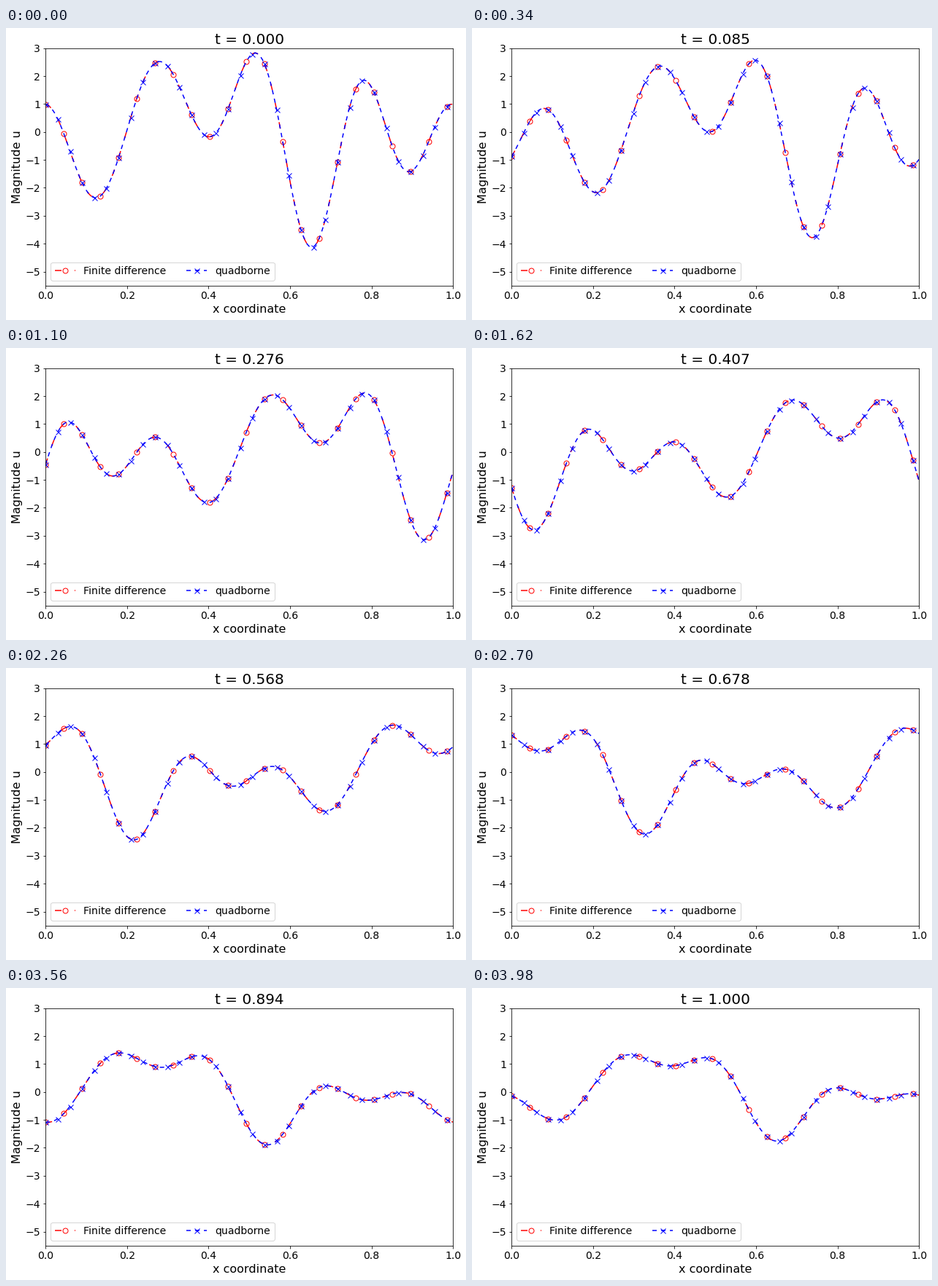
These frames come from a looping animation (630x401 px, 4000 ms). A matplotlib script:

```python
import numpy as np
import matplotlib.pyplot as plt
from matplotlib.animation import FuncAnimation

W, H, DPI = 630, 401, 72
FRAMES, INTERVAL = 200, 20

# Linear advection, first-order upwind on a periodic grid
NX, NT, DT, SPEED = 202, 2000, 0.0005, 1.0
x = np.linspace(0, 1, NX)
cfl = SPEED * DT / (x[1] - x[0])

COS = (-0.488, 0.118, -0.504, 1.72, 0.1445)
SIN = (0.694, -1.159, -0.195, 0.899, -0.368)


def initial(x):
    u = np.zeros_like(x)
    for k, (a, b) in enumerate(zip(COS, SIN), start=1):
        u += a * np.cos(2 * np.pi * k * x) + b * np.sin(2 * np.pi * k * x)
    return u


def solve():
    u = np.empty((NT + 1, NX))
    u[0] = initial(x)
    for n in range(NT):
        u[n + 1] = u[n] - cfl * (u[n] - np.roll(u[n], 1))
    return u


history = solve()
steps = np.linspace(0, NT, FRAMES).astype(int)

plt.rcParams["font.family"] = "DejaVu Sans"
fig = plt.figure(figsize=(W / DPI, H / DPI), dpi=DPI, facecolor="white")
ax = fig.add_axes([54.2 / W, 47.2 / H, 558 / W, 326.16 / H])
ax.set_xlim(0, 1)
ax.set_ylim(-5.5, 3)
ax.set_xticks(np.arange(6) / 5)
ax.set_yticks(range(-5, 4))
ax.tick_params(labelsize=14)
ax.set_xlabel("x coordinate", fontsize=16)
ax.set_ylabel("Magnitude u", fontsize=16)
title = ax.set_title("t = 0.000", fontsize=20)


def add_line(color, marker, dashes, every, label):
    line, = ax.plot(x, history[0], color=color, marker=marker, markersize=7,
                    fillstyle="none", linestyle=(0, dashes), linewidth=1.5,
                    markevery=every, label=label)
    return line


lines = [
    add_line("red", "o", (6, 12), 9, "Finite difference"),
    add_line("blue", "x", (4, 4), 6, "quadborne"),
]
ax.legend(loc="lower left", ncol=2, fontsize=14)


def update(i):
    n = steps[i]
    for line in lines:
        line.set_ydata(history[n])
    title.set_text(f"t = {n * DT:.3f}")
    return [*lines, title]


anim = FuncAnimation(fig, update, frames=FRAMES, interval=INTERVAL,
                     repeat=True, repeat_delay=0)
plt.show()
```
